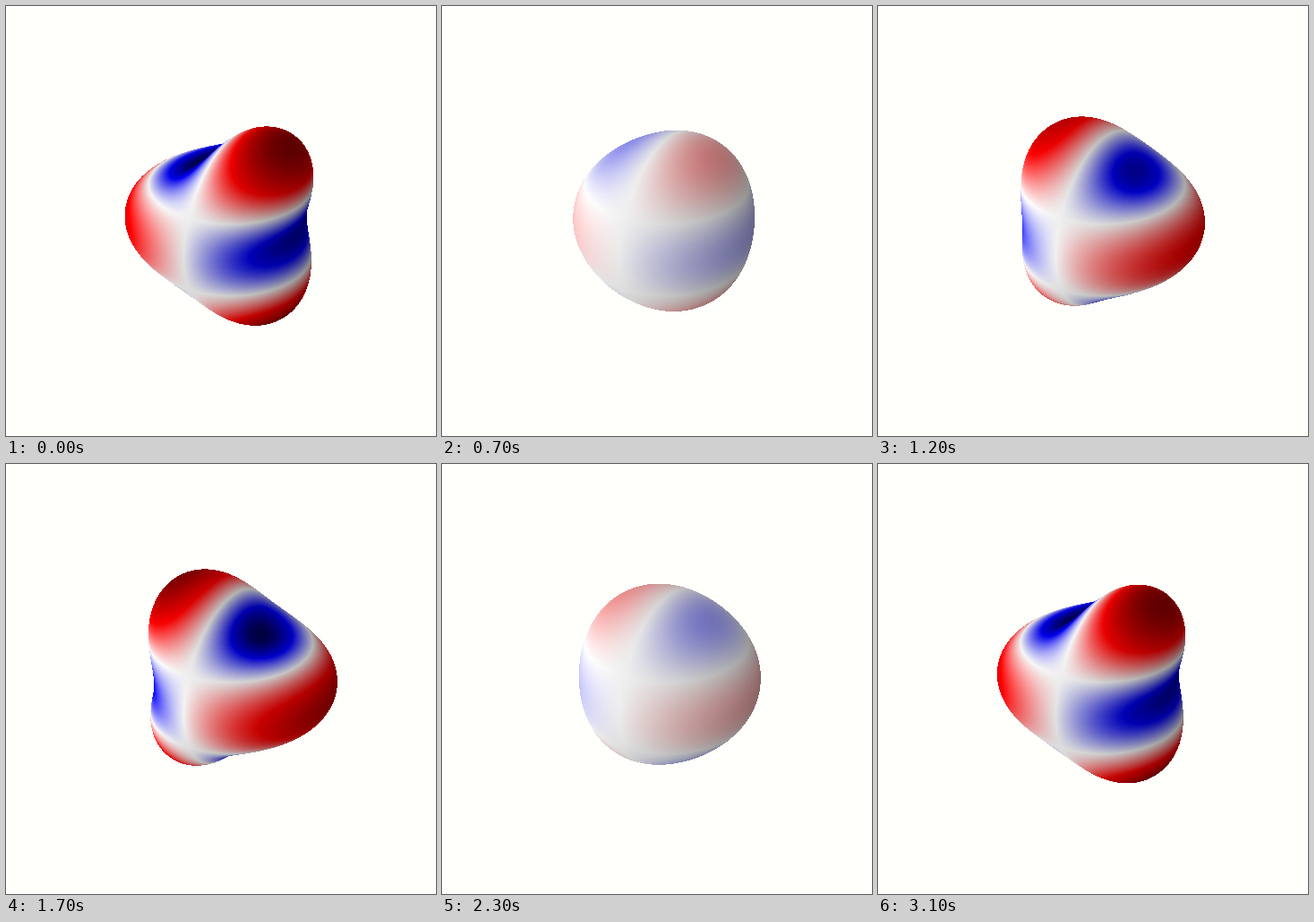
An HTML page with a canvas that plays this animation: 480 by 480 pixels, repeating every 3200 ms.

```html
<!DOCTYPE html>
<html>
<head>
<meta charset="utf-8">
<title>Oscillating spherical harmonic</title>
<style>
html, body { margin: 0; width: 100%; height: 100%; overflow: hidden; background: #fffffc; }
canvas { display: block; width: 480px; height: 480px; }
</style>
</head>
<body>
<canvas id="stage" width="480" height="480"></canvas>
<script>
const ctx = document.getElementById('stage').getContext('2d');
const STEPS = 32, STEP_MS = 100;
const SCALE = [101.2, 100.5], CENTER = [251, 237.3], DISTANCE = 20;
const SWING = 0.268, PEAK = 1.377;
const BOX = { x: 120, y: 105, w: 264, h: 264 };

// Camera basis: z stays up, azimuth -60 degrees, elevation 30 degrees.
const norm = v => { const l = Math.hypot(...v); return v.map(c => c / l); };
const cross = (a, b) => [a[1]*b[2] - a[2]*b[1], a[2]*b[0] - a[0]*b[2], a[0]*b[1] - a[1]*b[0]];
const azimuth = -Math.PI / 3, elevation = Math.PI / 6;
const eye = [
  Math.cos(elevation) * Math.cos(azimuth),
  Math.cos(elevation) * Math.sin(azimuth),
  Math.sin(elevation)
];
const right = norm(cross([0, 0, 1], eye));
const up = cross(eye, right);
const light = norm([-1, -1, 0.5]);

// Real spherical harmonic l = 3, m = 1, scaled to a peak of 1.
const harmonic = (x, y, z, r) => x * (5 * z * z - r * r) / (r * r * r * PEAK);

function surface(x, y, z, amp) {
  const r = Math.hypot(x, y, z);
  return r - 1 - amp * harmonic(x, y, z, r);
}

// Navy, blue, white, red, dark red at equal spacing over -1..1.
const RAMP = [[0, 0, 76], [0, 0, 255], [255, 255, 255], [255, 0, 0], [128, 0, 0]];
function ramp(v) {
  const s = Math.min(3.999, Math.max(0, 2 * v + 2)), i = Math.floor(s);
  return RAMP[i].map((c, j) => c + (RAMP[i + 1][j] - c) * (s - i));
}

function shade(x, y, z, phase) {
  const amp = SWING * phase, e = 0.004, f = surface(x, y, z, amp);
  const n = norm([
    surface(x + e, y, z, amp) - f,
    surface(x, y + e, z, amp) - f,
    surface(x, y, z + e, amp) - f
  ]);
  const lit = 0.75 + 0.25 * (n[0]*light[0] + n[1]*light[1] + n[2]*light[2]);
  return ramp(phase * harmonic(x, y, z, Math.hypot(x, y, z))).map(c => c * lit);
}

// First point of the surface along the view ray, or null.
function trace(sx, sy, amp) {
  let depth = 1.35;
  while (depth > -1.35) {
    const k = 1 - depth / DISTANCE, X = sx * k, Y = sy * k;
    const p = right.map((r, i) => r * X + up[i] * Y + eye[i] * depth);
    const gap = surface(...p, amp);
    if (gap < 0.001) return p;
    depth -= Math.max(gap * 0.7, 0.002);
  }
  return null;
}

function render(step) {
  const phase = Math.cos(2 * Math.PI * step / STEPS);
  const image = ctx.createImageData(BOX.w, BOX.h);
  for (let j = 0; j < BOX.h; j++) for (let i = 0; i < BOX.w; i++) {
    const sx = (BOX.x + i + 0.5 - CENTER[0]) / SCALE[0];
    const sy = (CENTER[1] - BOX.y - j - 0.5) / SCALE[1];
    if (sx * sx + sy * sy > 1.8) continue;
    const hit = trace(sx, sy, SWING * phase);
    if (hit) image.data.set([...shade(...hit, phase), 255], 4 * (j * BOX.w + i));
  }
  return image;
}

const cache = [];
let shown = -1;
function draw(now) {
  const step = Math.floor(now / STEP_MS) % STEPS;
  if (step !== shown) {
    shown = step;
    // The swing is symmetric in time, so both halves share images.
    const key = Math.min(step, STEPS - step);
    cache[key] = cache[key] || render(key);
    ctx.putImageData(cache[key], BOX.x, BOX.y);
  }
}
const start = performance.now();
function tick() {
  draw(performance.now() - start);
  requestAnimationFrame(tick);
}
tick();
</script>
</body>
</html>
```
